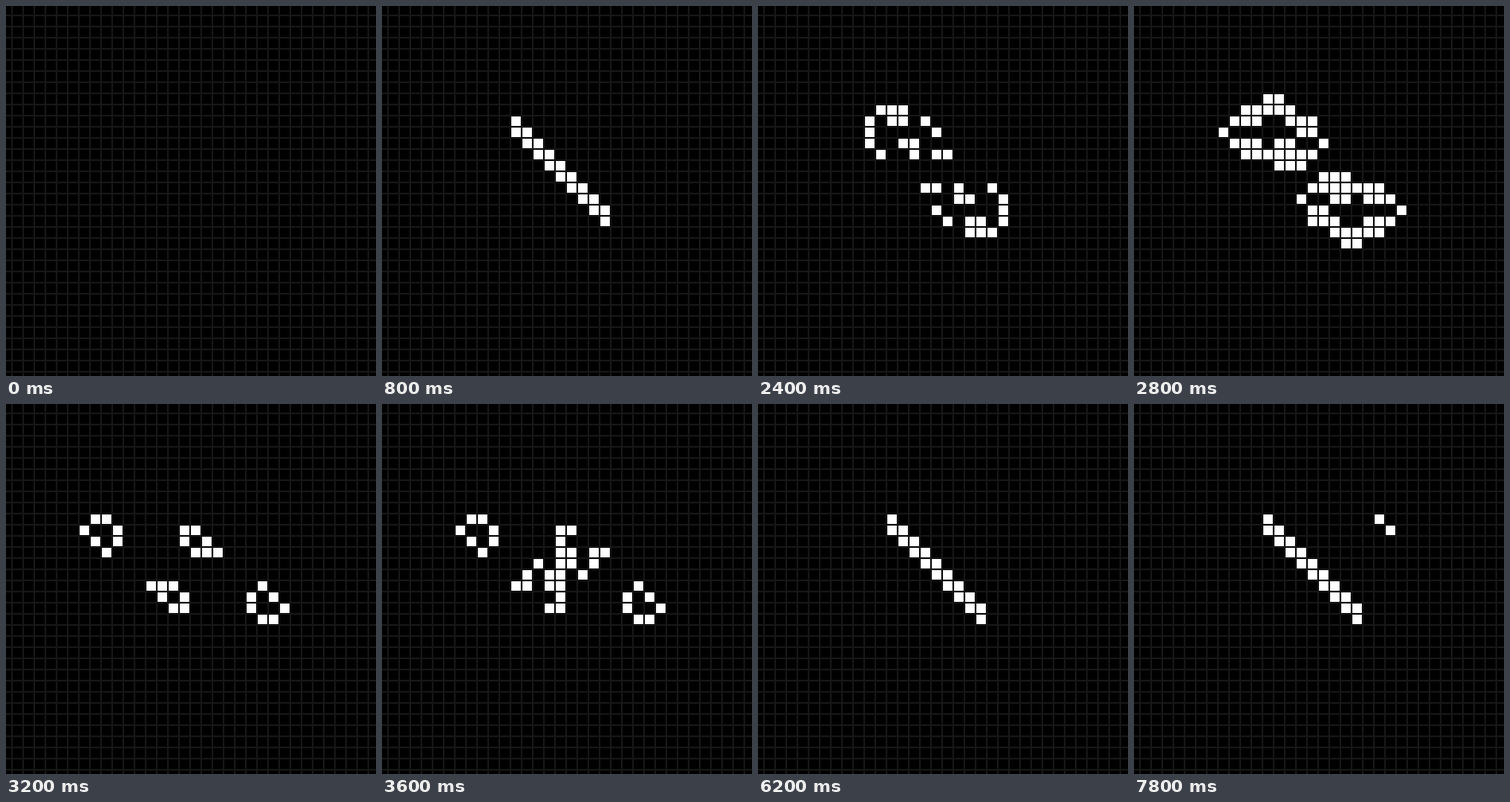
An HTML page with a canvas for the animation above (8000 ms loop, 432 by 432 pixels).

```html
<!DOCTYPE html>
<html lang="en">
<head>
<meta charset="utf-8">
<title>Game of Life</title>
<style>
  html, body { margin: 0; width: 100%; height: 100%; overflow: hidden; background: #000; }
  canvas { display: block; }
</style>
</head>
<body>
<canvas id="stage" width="432" height="432"></canvas>
<script>
const SIZE = 432, PITCH = 13, CELL = 11, GAP = PITCH - CELL;
const ORIGIN = { x: 151, y: 129 };   // pixel corner of cell 0,0
const LOOP = 8000, TICK = 200;
const DRAWN = 800, RUN = 1740, STEP = 120, REDRAWN = 6200;
const LAST_GENERATION = 24;
const ctx = document.getElementById('stage').getContext('2d');

const key = (col, row) => col + ',' + row;
const parse = cell => cell.split(',').map(Number);

function staircase(length) {
  const cells = new Set();
  for (let k = 0; k < length; k++) cells.add(key(k, k)).add(key(k, k + 1));
  return cells;
}

function evolve(cells) {
  const counts = new Map();
  for (const cell of cells) {
    const [col, row] = parse(cell);
    for (let dx = -1; dx <= 1; dx++) {
      for (let dy = -1; dy <= 1; dy++) {
        if (!dx && !dy) continue;
        const near = key(col + dx, row + dy);
        counts.set(near, (counts.get(near) || 0) + 1);
      }
    }
  }
  const next = new Set();
  for (const [cell, n] of counts) {
    if (n === 3 || (n === 2 && cells.has(cell))) next.add(cell);
  }
  return next;
}

const generations = [staircase(9)];
while (generations.length <= LAST_GENERATION) generations.push(evolve(generations.at(-1)));

function cellsAt(time) {
  if (time < DRAWN) return [];
  if (time < RUN) return generations[0];
  if (time < REDRAWN) {
    const n = Math.floor((time - RUN) / STEP) + 1;
    return generations[Math.min(n, LAST_GENERATION)];
  }
  const cells = [...generations[0]];
  if (time >= 7000) cells.push(key(10, 0));
  if (time >= 7800) cells.push(key(11, 1));
  return cells;
}

function draw(time) {
  ctx.fillStyle = '#000';
  ctx.fillRect(0, 0, SIZE, SIZE);
  ctx.fillStyle = '#161616';
  for (let x = (ORIGIN.x - GAP) % PITCH; x < SIZE; x += PITCH) ctx.fillRect(x, 0, GAP, SIZE);
  for (let y = (ORIGIN.y - GAP) % PITCH; y < SIZE; y += PITCH) ctx.fillRect(0, y, SIZE, GAP);
  ctx.fillStyle = '#fff';
  for (const cell of cellsAt(time)) {
    const [col, row] = parse(cell);
    ctx.fillRect(ORIGIN.x + col * PITCH, ORIGIN.y + row * PITCH, CELL, CELL);
  }
}

const start = performance.now();
let shown = -1;
function frame() {
  const elapsed = (performance.now() - start) % LOOP;
  const time = Math.floor(elapsed / TICK) * TICK;
  if (time !== shown) draw(shown = time);
  requestAnimationFrame(frame);
}
frame();
</script>
</body>
</html>
```
